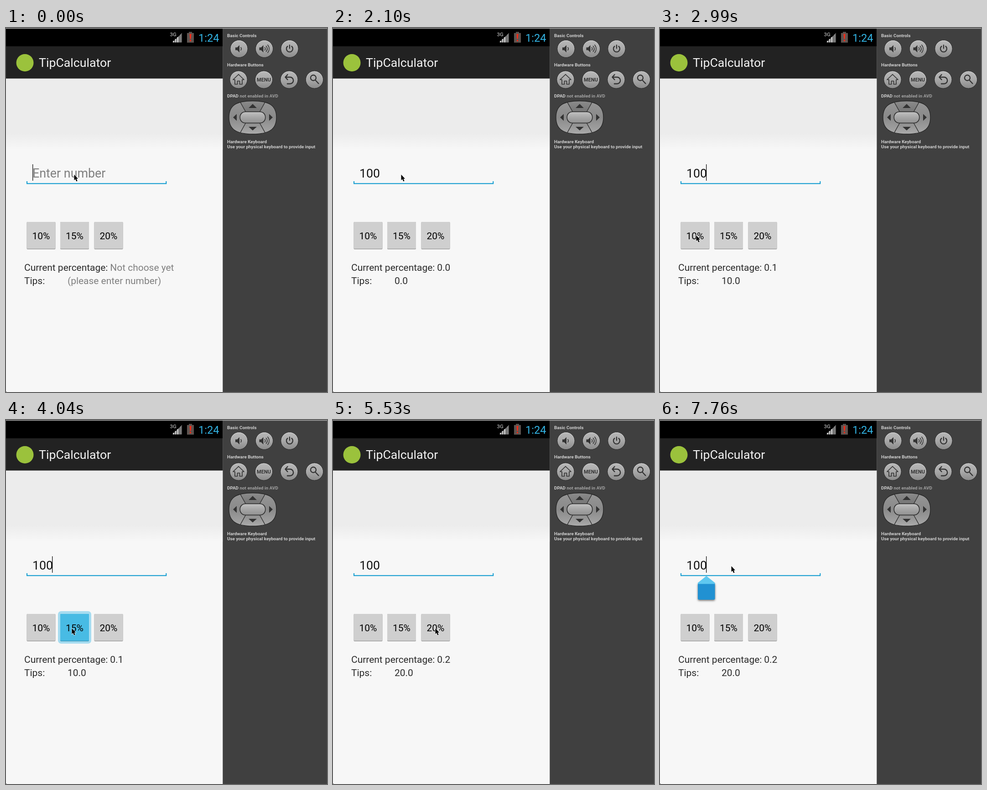
These frames come from a looping animation (704 by 796 pixels, 8000 ms). An HTML page with a canvas:

```html
<!DOCTYPE html>
<html lang="en">
<head>
<meta charset="utf-8">
<title>Tip calculator</title>
<style>
html, body { margin: 0; width: 100%; height: 100%; overflow: hidden; background: #404040; }
canvas { display: block; }
</style>
</head>
<body>
<canvas id="stage" width="704" height="796"></canvas>
<script>
const ctx = document.getElementById('stage').getContext('2d');
const LOOP = 8000, STEP = 149.2;
const PHONE_WIDTH = 475.5, BODY_TEXT = 20.95;
const FONT = 'Roboto, sans-serif';

// Everything below is keyed by step number.
const CARET_TOGGLES = [2, 5, 10, 11, 14, 17, 21, 24, 28, 31, 35, 38, 41, 45, 49, 52];
const TYPED = [[0, ''], [5, '1'], [7, '10'], [11, '100']];
const RESULTS = [
  [0, null], [5, ['0.0', '0.0']], [20, ['0.1', '10.0']],
  [28, ['0.15', '15.0']], [37, ['0.2', '20.0']]
];
const PRESSES = { 19: 0, 27: 1, 36: 2 };
const HANDLE_AT = 48;
const POINTER = [
  [0, 149, 320], [14, 149, 320], [18, 79, 453], [21, 79, 453], [23, 110, 474],
  [25, 144, 455], [29, 144, 455], [33, 224, 455], [40, 224, 455],
  [44, 145, 334], [46, 156, 319], [60, 156, 319]
];
const BUTTONS = [[46, '10%'], [119.5, '15%'], [194, '20%']];

const latest = (keys, step) => keys.filter(k => k[0] <= step).pop()[1];

function text(str, x, y, size, color, weight = 400, align = 'left') {
  ctx.font = `${weight} ${size}px ${FONT}`;
  ctx.textAlign = align;
  ctx.fillStyle = color;
  ctx.fillText(str, x, y);
  return ctx.measureText(str).width;
}

function rect(x, y, w, h, color) {
  ctx.fillStyle = color;
  ctx.fillRect(x, y, w, h);
}

function roundRect(x, y, w, h, r, color) {
  ctx.beginPath();
  ctx.roundRect(x, y, w, h, r);
  ctx.fillStyle = color;
  ctx.fill();
}

function fade(y0, y1, ...colors) {
  const g = ctx.createLinearGradient(0, y0, 0, y1);
  colors.forEach((c, i) => g.addColorStop(i / (colors.length - 1), c));
  return g;
}

function shape(path, fill, stroke, width = 1) {
  const p = new Path2D(path);
  if (fill) { ctx.fillStyle = fill; ctx.fill(p); }
  if (stroke) { ctx.strokeStyle = stroke; ctx.lineWidth = width; ctx.stroke(p); }
}

function at(x, y, draw) {
  ctx.save();
  ctx.translate(x, y);
  draw();
  ctx.restore();
}

function drawStatusBar() {
  rect(0, 0, PHONE_WIDTH, 40, '#000');
  text('3G', 359.5, 18, 11.5, '#aaa', 500);
  shape('M365 31.5 L386 10.5 V31.5Z', '#5c5c5c');
  shape('M366 31.5V28H369V31.5Z M370.5 31.5V24H373.5V31.5Z M375 31.5V20H378V31.5Z', '#c4c4c4');
  shape('M379.5 18V31.5 M383 14V31.5', null, '#8c8c8c', 2);
  rect(401, 8.5, 7, 3, '#5e5450');
  rect(397, 11, 15, 21, '#5e5450');
  shape('M402.5 13H406.5L405.5 24H403.5Z', '#ff2a16');
  rect(403, 26, 3, 3, '#ff2a16');
  text('1:24', 422, 30, 23.7, '#33b5e5');
}

function drawTitleBar() {
  rect(0, 40, PHONE_WIDTH, 70.5, '#222');
  ctx.beginPath();
  ctx.arc(41.5, 76, 19, 0, 7);
  ctx.fillStyle = '#9bc23c';
  ctx.fill();
  text('TipCalculator', 72, 85, 26.7, '#f3f3f3');
}

function roundButton(x, y, icon) {
  at(x, y, () => {
    ctx.beginPath();
    ctx.arc(0, 0, 19, 0, 7);
    ctx.fillStyle = fade(-19, 19, '#b8b8b8', '#a8a8a8', '#8a8a8a');
    ctx.fill();
    ctx.strokeStyle = '#2c2c2c';
    ctx.lineWidth = 1;
    ctx.stroke();
    ctx.beginPath();
    ctx.arc(0, 0, 17.8, 0, 7);
    ctx.strokeStyle = fade(-18, 18, '#d8d8d8', '#8e8e8e');
    ctx.stroke();
    ctx.lineCap = ctx.lineJoin = 'round';
    icon();
  });
}

const INK = '#333';
const SPEAKER = 'M-8 -3H-4L1 -8V8L-4 3H-8Z';

function drawPad() {
  const outline = 'M541 159.5C578 159.5 593 170 593 195.5S578 232 541 232S489 221 489 195.5S504 159.5 541 159.5Z';
  ctx.save();
  ctx.clip(new Path2D(outline));
  rect(488, 158, 106, 76, fade(159, 232, '#969696', '#8a8a8a', '#a8a8a8'));
  shape('M511 159L526 184H556L571 159Z', fade(159, 184, '#8d8d8d', '#747474'));
  shape('M511 232L526 207H556L571 232Z', fade(207, 232, '#8c8c8c', '#acacac'));
  shape('M511 157L526 184M571 157L556 184M511 234L526 207M571 234L556 207', null, '#333', 1.5);
  ctx.restore();
  shape(outline, null, '#242424', 1.3);
  roundRect(512.5, 182.5, 57, 26, 12, '#2e2e2e');
  roundRect(514, 184, 54, 23, 11, fade(184, 207, '#c0c0c0', '#a6a6a6', '#929292'));
  shape('M532 175L541 166L550 175Z M532 216L541 224L550 216Z M506 188L498 195.5L506 203Z M577 188L585 195.5L577 203Z', INK);
}

function drawPanel() {
  rect(PHONE_WIDTH, 0, 704 - PHONE_WIDTH, 796, '#404040');
  const label = (str, y, color = '#cfcfcf', x = 485) => text(str, x, y, 9.9, color, 700);
  label('Basic Controls', 19.5);
  label('Hardware Buttons', 84);
  const w = label('DPAD ', 151.5);
  label('not enabled in AVD', 151.5, '#a2a2a2', 485 + w);
  label('Hardware Keyboard', 251.5);
  label('Use your physical keyboard to provide input', 262.5);

  roundButton(511, 45.5, () => {
    shape(SPEAKER, INK);
    shape('M4 -3Q6.5 0 4 3', null, INK, 1.6);
  });
  roundButton(566.5, 45.5, () => {
    at(-3, 0, () => shape(SPEAKER, INK));
    shape('M1 -3Q3.5 0 1 3M4 -6Q9 0 4 6M7.5 -8.5Q14 0 7.5 8.5', null, INK, 1.6);
  });
  roundButton(622, 45.5, () => shape('M0 -8V-1M-4.5 -5.5A7 7 0 1 0 4.5 -5.5', null, INK, 2.3));
  roundButton(510, 113, () => shape('M-12 0L0 -11.5L12 0H8V10H2.5V3H-2.5V10H-8V0Z', null, INK, 1.7));
  roundButton(565.5, 113, () => text('MENU', 0, 4, 11, INK, 700, 'center'));
  roundButton(621, 113, () => shape('M-3.5 -11L-8.5 -5.5L-3.5 0M-8 -5.5H2A7 7 0 0 1 2 9H-4', null, INK, 2.4));
  roundButton(676.5, 113, () => shape('M3.5 -4A6 6 0 1 1 -8.5 -4A6 6 0 1 1 3.5 -4M2 1L9 8.5', null, INK, 2.3));
  drawPad();
}

function drawField(step) {
  const typed = latest(TYPED, step);
  if (typed) text(typed, 58, 326.5, 26.6, '#111');
  else text('Enter number', 58, 326.5, 26.85, '#808080');

  shape('M46 335V340.3H351.3V335', null, '#0f9bd0', 2);

  const flips = CARET_TOGGLES.filter(k => k <= step).length;
  if (flips % 2 === 0) {
    const x = [58, 72, 87, 101][typed.length];
    rect(x, 298, 1.3, 36, '#111');
  }
}

function drawButtons(step) {
  BUTTONS.forEach(([x, label], i) => {
    const pressed = PRESSES[step] === i;
    if (pressed) roundRect(x - 5.5, 418, 73, 71, 7, '#a6dcf0');
    roundRect(x - 0.5, 424, 63, 60, 2, pressed ? '#3a93b3' : '#989898');
    roundRect(x - 0.5, 424, 63, 58.7, 2, pressed ? '#48bbe4' : '#cfcfcf');
    text(label, x + 31, 462, BODY_TEXT, '#000', 400, 'center');
  });
}

function drawResults(step) {
  const result = latest(RESULTS, step);
  const [rate, tips] = result || ['Not choose yet', '(please enter number)'];
  const color = result ? '#2b2b2b' : '#808080';
  text('Current percentage:', 40, 531, BODY_TEXT, '#2b2b2b');
  text('Tips:', 40, 560, BODY_TEXT, '#2b2b2b');
  text(rate, 228.3, 531, BODY_TEXT, color);
  text(tips, 135, 560, BODY_TEXT, color);
}

function drawHandle() {
  ctx.save();
  ctx.shadowColor = 'rgba(0,0,0,.55)';
  ctx.shadowBlur = 4;
  ctx.shadowOffsetY = 2;
  roundRect(83, 356, 37.5, 37, 3, '#2191d2');
  ctx.restore();
  shape('M101.7 341L120.5 356V358.5H83V356Z', '#5fc8f0');
}

function drawPointer(step) {
  const next = POINTER.findIndex(k => k[0] > step);
  const [s0, x0, y0] = POINTER[next - 1], [s1, x1, y1] = POINTER[next];
  const u = (step - s0) / (s1 - s0), e = u * u * (3 - 2 * u);
  const arrow = 'M0.5 0.5V13L3.2 10.6L5.3 15.5L7.6 14.5L5.5 9.8H9Z';
  at(x0 + (x1 - x0) * e, y0 + (y1 - y0) * e, () => {
    shape(arrow, null, 'rgba(255,255,255,.75)', 1.6);
    shape(arrow, '#000');
  });
}

function draw(time) {
  const step = Math.floor((time % LOOP) / STEP);
  rect(0, 0, PHONE_WIDTH, 796, '#f7f7f7');
  rect(0, 110, PHONE_WIDTH, 120, '#ececec');
  rect(0, 230, PHONE_WIDTH, 36, fade(230, 266, '#ececec', '#f7f7f7'));
  drawStatusBar();
  drawTitleBar();
  drawPanel();
  rect(0, 0, 704, 1.5, '#a0a0a0');
  rect(0, 795, 1, 1, '#000');
  drawField(step);
  if (step >= HANDLE_AT) drawHandle();
  drawButtons(step);
  drawResults(step);
  drawPointer(step);
}

let start;
function tick(now) {
  start ??= now;
  draw(now - start);
  requestAnimationFrame(tick);
}
draw(0);
requestAnimationFrame(tick);
</script>
</body>
</html>
```
